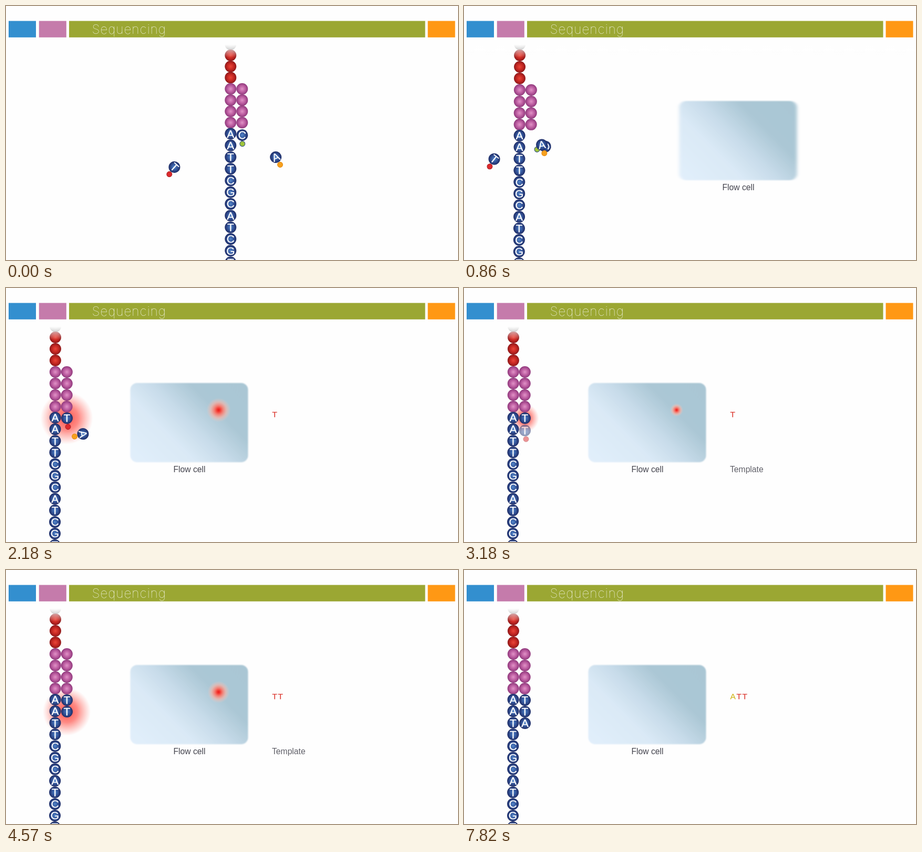
These frames come from a looping animation (860x484 px, 8000 ms). An HTML page:

```html
<!DOCTYPE html>
<html lang="en">
<head>
<meta charset="utf-8">
<title>Sequencing</title>
<style>
html, body { margin: 0; width: 100%; height: 100%; overflow: hidden; background: #fefefe; }
svg { display: block; width: 100vw; height: 100vh; }
text { font-family: "Liberation Sans", Arial, sans-serif; }
.title { font: 100 24.5px Inter, sans-serif; letter-spacing: .85px; fill: #fff; }
.base { font-size: 21px; fill: #fff; stroke: #fff; stroke-width: .3px; text-anchor: middle; }
.label { font-size: 15.7px; fill: #44444e; }
.read { font-size: 15.5px; letter-spacing: 1.6px; font-kerning: none; fill: #dd4038; stroke: #dd4038; stroke-width: .25px; }
</style>
</head>
<body>
<svg viewBox="0 0 860 484">
  <defs>
    <radialGradient id="blue"><stop offset="0" stop-color="#5286c8"/><stop offset=".45" stop-color="#385c a2"/><stop offset="1" stop-color="#1e2c66"/></radialGradient>
    <radialGradient id="pink"><stop offset="0" stop-color="#e093c6"/><stop offset=".5" stop-color="#c162a5"/><stop offset="1" stop-color="#90397c"/></radialGradient>
    <radialGradient id="red"><stop offset="0" stop-color="#e8463a"/><stop offset=".5" stop-color="#cb2a24"/><stop offset="1" stop-color="#8e181a"/></radialGradient>
    <radialGradient id="grey"><stop offset="0" stop-color="#bbb"/><stop offset="1" stop-color="#888"/></radialGradient>
    <radialGradient id="glow"><stop offset="0" stop-color="#ff463e" stop-opacity=".95"/><stop offset=".45" stop-color="#ff5e56" stop-opacity=".72"/><stop offset="1" stop-color="#ff8078" stop-opacity="0"/></radialGradient>
    <radialGradient id="spot"><stop offset="0" stop-color="#ec1a1a"/><stop offset=".14" stop-color="#f43a32"/><stop offset=".35" stop-color="#fb7466" stop-opacity=".9"/><stop offset=".65" stop-color="#f8b0a2" stop-opacity=".65"/><stop offset="1" stop-color="#f4cabe" stop-opacity="0"/></radialGradient>
    <linearGradient id="glass" gradientUnits="userSpaceOnUse" x1="18" y1="169" x2="206" y2="-19">
      <stop offset="0" stop-color="#e2effb"/><stop offset=".33" stop-color="#dae9f6"/><stop offset=".5" stop-color="#c8dcea"/><stop offset=".7" stop-color="#abc7d5"/><stop offset="1" stop-color="#a9c6d4"/>
    </linearGradient>
    <linearGradient id="fade" x2="0" y2="1"><stop offset=".35" stop-color="#fefefe"/><stop offset="1" stop-color="#fefefe" stop-opacity="0"/></linearGradient>
    <filter id="smear" filterUnits="userSpaceOnUse" x="-60" y="0" width="980" height="520"><feGaussianBlur stdDeviation="0 0"/></filter>
    <filter id="soft" x="-10%" y="-10%" width="120%" height="120%"><feGaussianBlur stdDeviation="1 1"/></filter>
  </defs>
  <rect width="860" height="484" fill="#fefefe"/>
  <g id="cell">
    <rect width="224" height="151" rx="13" fill="url(#glass)" filter="url(#soft)"/>
    <circle id="spotlight" cx="168" cy="51.5" fill="url(#spot)"/>
    <text class="label" x="82" y="170">Flow cell</text>
  </g>
  <text class="label" id="template" x="506" y="351">Template</text>
  <text class="read" id="read" x="506.5" y="246"></text>
  <g id="strand"></g>
  <rect x="0" y="60" width="860" height="38" fill="url(#fade)"/>
  <rect x="5" y="28.5" width="52" height="31.3" fill="#338fcf"/>
  <rect x="62.8" y="28.5" width="52" height="31.3" fill="#c57bab"/>
  <rect x="120" y="28.5" width="677.5" height="31.3" fill="#9ba733"/>
  <rect x="802.5" y="28.5" width="52" height="31.3" fill="#ff9814"/>
  <text class="title" x="163.5" y="52.5">Sequencing</text>
</svg>
<script>
const LOOP = 8000, PAIR = 22;
const $ = id => document.getElementById(id);
const set = (el, attrs) => { for (const k in attrs) el.setAttribute(k, attrs[k]); return el; };
const make = (tag, attrs, parent) =>
  parent.appendChild(set(document.createElementNS('http://www.w3.org/2000/svg', tag), attrs));
const lerp = (a, b, p) => a + (b - a) * p;
const ramp = (t, a, b) => Math.min(1, Math.max(0, (t - a) / (b - a)));
const ease = u => (1 - Math.cos(Math.PI * u)) / 2;

const strand = $('strand');
const glows = [0, 1].map(() => make('circle', { fill: 'url(#glow)' }, strand));

function ball(fill, letter, parent = strand) {
  const g = make('g', {}, parent);
  make('circle', { r: 11, fill: `url(#${fill})` }, g);
  if (letter) make('text', { class: 'base', y: 7.3 }, g).textContent = letter;
  return g;
}

// Beads of the strand: column offset, y before and after it settles.
const beads = [];
const bead = (fill, letter, dx, y0, y1) => beads.push({ el: ball(fill, letter), dx, y0, y1 });
bead('grey', '', 0, 73, 73);
for (let i = 0; i < 3; i++) bead('red', '', 0, 94 + 21.2 * i, 94 + 22 * i);
for (let i = 0; i < 4; i++)
  for (const dx of [0, PAIR]) bead('pink', '', dx, 158 + 21.4 * i, 160 + 22 * i);
[...'AATTCGCATCGT'].forEach((c, i) => bead('blue', c, 0, 243.3 + 22.3 * i, 247 + 22.1 * i));

// Poses of free nucleotides, with x measured from the strand.
const leave = (u, y) => ({
  x: PAIR + 51 * u ** 1.75, y: y + 35 * u ** 1.27, turn: 90 * u ** .4, alpha: 1 - ramp(u, .75, 1.25)
});
const appear = (u, y) => ({ x: PAIR, y: y + 6 * (1 - u) ** 2, turn: 0, alpha: u });
const visitA = t => {
  const u = t / 1250;
  return u > 1 ? leave(u - 1, 254)
    : { x: lerp(86, PAIR, u), y: lerp(288, 254, u), turn: lerp(-23, -4, u), alpha: 1 };
};
const bindT = t => {
  const u = ramp(t, 0, 1900);
  return { x: lerp(-107, PAIR, u), y: lerp(307, 248, u ** 1.7), turn: 42 * (1 - u ** 3), alpha: 1 };
};

const tags = { A: ['#f6a01e', '#e58a10'], T: ['#dc2a2c', '#a81a20'], C: ['#9fc43a', '#2c4a86'] };
function flyer(letter, cut, pose) {
  const el = make('g', {}, strand), [fill, stroke] = tags[letter];
  const tag = make('circle', { cx: 2, cy: 16.5, r: 5, fill, stroke }, el);
  ball('blue', letter, el);
  return { el, tag, cut, pose };
}
const flyers = [
  flyer('C', LOOP, t => leave(t / 1250, 246)),
  flyer('A', LOOP, visitA),
  flyer('T', 2300, bindT),
  flyer('T', 3900, t => appear(ramp(t, 2980, 3380), 270)),
  flyer('A', 7150, t => appear(ramp(t, 6420, 6820), 292))
];

const flash = (t, t0) => 50 * ramp(t, t0, t0 + 300) * (1 - ramp(t, t0 + 500, t0 + 1900) ** 1.5);
const slide = t => ease(ramp(t, 150, 960));
const strandX = t => lerp(427.3, 94, slide(t));
const cellX = t => lerp(870, 236.5, ease(ramp(t, -75, 1365)));
const speed = (f, t) => Math.abs(f(t + 10) - f(t - 10)) / 20;

function draw(t) {
  const p = slide(t), x = strandX(t);
  const lean = -(p + 10 * p * (1 - p)) / 372;
  for (const { el, dx, y0, y1 } of beads) {
    const y = lerp(y0, y1, p);
    set(el, { transform: `translate(${x + dx + lean * (y - 94)} ${y})` });
  }
  for (const { el, tag, cut, pose } of flyers) {
    const q = pose(t);
    set(el, { transform: `translate(${x + q.x} ${q.y}) rotate(${q.turn})`, opacity: q.alpha });
    set(tag, { opacity: 1 - ramp(t, cut, cut + 250) });
  }

  const radii = [flash(t, 1850), flash(t, 3800)];
  radii.forEach((r, i) => set(glows[i], { cx: x + 21.5, cy: 248 + 22 * i, r }));
  set($('spotlight'), { r: Math.max(...radii) * .46 });

  const v = speed(strandX, t);
  if (v > .02) {
    set($('smear').firstChild, { stdDeviation: `${v * 2.8} 0` });
    set(strand, { filter: 'url(#smear)' });
  } else strand.removeAttribute('filter');

  set($('cell'), { transform: `translate(${cellX(t)} 181)` });
  set($('soft').firstChild, { stdDeviation: `${1 + speed(cellX, t) * 3.5} 1` });

  set($('template'), { opacity: .85 * ramp(t, 2300, 2700) * (1 - ramp(t, 6700, 7400)) });
  const read = t < 2100 ? '' : t < 4050 ? 'T' : t < 7200 ? 'TT' : 'ATT';
  if ($('read').textContent !== read) {
    $('read').innerHTML = read.replace('A', '<tspan fill="#d3b722" stroke="#d3b722">A</tspan>');
  }
}

// Fix the middle tone of the blue beads.
set($('blue').children[1], { 'stop-color': '#385ca2' });

const start = performance.now();
(function tick() {
  draw((performance.now() - start) % LOOP);
  requestAnimationFrame(tick);
})();
</script>
</body>
</html>
```
